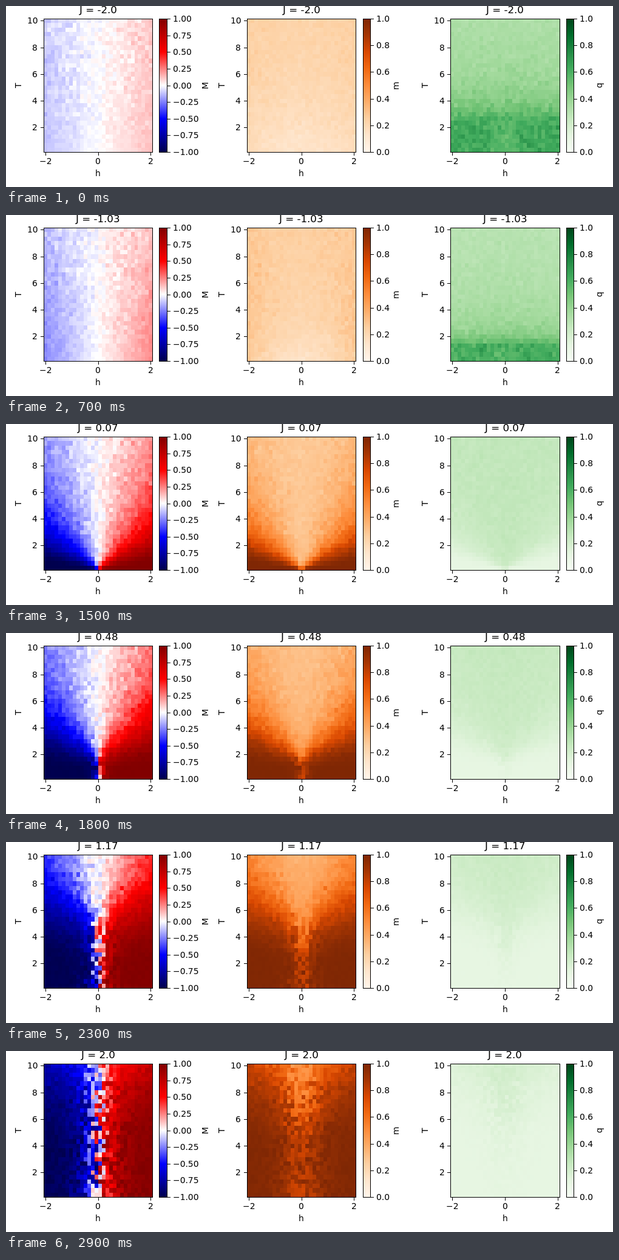
An HTML page with a canvas that plays this animation: 1000 px wide and 300 px high, repeating every 3000 ms.

```html
<!DOCTYPE html>
<html lang="en">
<head>
<meta charset="utf-8">
<title>Spin lattice maps</title>
<style>
html, body { margin: 0; width: 100%; height: 100%; overflow: hidden; background: #fff; }
canvas { display: block; }
</style>
</head>
<body>
<canvas id="stage" width="1000" height="300"></canvas>
<script>
const ctx = document.getElementById('stage').getContext('2d');
const N = 30, STEPS = 30, STEP_MS = 100;
const TOP = 21, W = 179.4, H = 221;
const FONT = '"DejaVu Sans", sans-serif';

const ramp = s => s.split(' ').map(c => [0, 2, 4].map(i => parseInt(c.substr(i, 2), 16)));
const seismic = ramp('00004d 0000ff ffffff ff0000 800000');
const oranges = ramp('fff5eb fee6ce fdd0a2 fdae6b fd8d3c f16913 d94801 a63603 7f2704');
const greens = ramp('f7fcf5 e5f5e0 c7e9c0 a1d99b 74c476 41ab5d 238b45 006d2c 00441b');

const panels = [
  { x: 62, bar: [252, 265], map: seismic, lo: -1, label: 'M', labelX: 333, tick: 0.25, digits: 2 },
  { x: 397, bar: [588, 600], map: oranges, lo: 0, label: 'm', labelX: 647, tick: 0.2, digits: 1 },
  { x: 732.3, bar: [923, 935], map: greens, lo: 0, label: 'q', labelX: 982, tick: 0.2, digits: 1 }
];

const clamp = (v, a, b) => Math.min(b, Math.max(a, v));

function color(map, v) {
  const p = clamp(v, 0, 1) * (map.length - 1);
  const i = Math.min(Math.floor(p), map.length - 2), f = p - i;
  return `rgb(${map[i].map((c, k) => Math.round(c + (map[i + 1][k] - c) * f))})`;
}

function random(seed) {
  return () => {
    seed = (seed + 0x6D2B79F5) | 0;
    let t = Math.imul(seed ^ (seed >>> 15), 1 | seed);
    t = (t + Math.imul(t ^ (t >>> 7), 61 | t)) ^ t;
    return ((t ^ (t >>> 14)) >>> 0) / 4294967296;
  };
}

const coupling = J => J < 0 ? 4 * J : (4 + 0.55 * J) * J;

// Mean-field magnetisation for a positive field h
function meanField(J, T, h) {
  const K = coupling(J);
  if (J < 0) {
    const ordered = Math.tanh(h / (Math.hypot(T, 4.4 * J) - K));
    return Math.max(ordered, Math.tanh((h + K) / T));
  }
  let M = 1;
  for (let i = 0; i < 40; i++) M = Math.tanh((h + K * M) / T);
  return M;
}

// Magnetisation, local magnetisation and local staggered order of one cell
function cell(J, T, h, rnd) {
  const gauss = () => (rnd() + rnd() + rnd() - 1.5) * 2;
  const a = Math.abs(h), x = J / T;
  const mean = meanField(J, T, a), free = 1 - mean * mean;
  const walls = J > 0 ? Math.exp(-a / (0.19 * J + 0.02)) + 0.01 * J : 0;
  const spread = 0.036 * Math.sqrt(free * T / Math.max(T - coupling(J) * free, 0.08 * T));
  const M = clamp(Math.sign(h) * mean * (1 - 2 * walls * rnd()) + spread * gauss(), -1, 1);

  const m0 = J < 0 ? 0.14 + 0.13 * Math.exp(2 * x) : Math.min(0.78, 0.27 * Math.exp(2.5 * x));
  const m = Math.sqrt(m0 * m0 * (1 - M * M) + M * M) + 0.011 * gauss() * (1 - M * M);

  let q0 = 0.14 + 0.13 * Math.exp(-2 * x), extra = 0;
  if (J < 0) {
    const grown = 0.27 * Math.exp(-x);
    extra = Math.min(0.61, grown) - 0.27;
    if (grown > 0.61) extra *= 1 - 0.2 * Math.exp(-4 * h * h);
    extra *= 1 - 0.4 * clamp(a / (-2 * J) - 1, 0, 1);
    q0 = 0.27 + extra;
  }
  const loose = Math.max(0, 1 - m * m);
  const q = 0.11 + 1.08 * (q0 - 0.11) * loose + (0.009 + 0.08 * extra) * loose * gauss();
  return [M, m, q];
}

// Text starts on whole pixels; align is the share of its width left of x
function text(s, x, y, align = 0.5, size = 13.89) {
  ctx.font = `${size}px ${FONT}`;
  ctx.fillText(s, Math.round(x - align * ctx.measureText(s).width), Math.round(y));
}

function sideways(s, x) {
  ctx.save();
  ctx.translate(Math.round(x), 132);
  ctx.rotate(-Math.PI / 2);
  text(s, 0, 0);
  ctx.restore();
}

function frame(x0, x1) {
  ctx.strokeRect(x0 + 0.5, TOP + 0.5, x1 - x0, H);
}

const signed = s => s.replace('-', '\u2212');

function drawAxes(p, title) {
  const mid = p.x + 89.7, [b0, b1] = p.bar, left = Math.round(p.x), bottom = TOP + H;
  for (let y = 0; y < H; y++) {
    ctx.fillStyle = color(p.map, 1 - (y + 0.5) / H);
    ctx.fillRect(b0, TOP + y, b1 - b0, 1);
  }
  ctx.fillStyle = ctx.strokeStyle = '#000';
  ctx.lineWidth = 1;
  frame(left, Math.round(p.x + W));
  frame(b0, b1);

  for (const h of [-2, 0, 2]) {
    const x = mid + h * 43.3;
    ctx.fillRect(Math.round(x), bottom + 1, 1, 5);
    text(signed(String(h)), x, 262);
  }
  for (let T = 2; T <= 10; T += 2) {
    const y = bottom - 0.3 - (T - 1 / 6) * 22.1;
    ctx.fillRect(left - 5, Math.round(y), 5, 1);
    text(String(T), p.x - 9.7, y + 5, 1);
  }
  const count = Math.round((1 - p.lo) / p.tick);
  for (let i = 0; i <= count; i++) {
    const y = Math.round(bottom - H * i / count);
    ctx.fillRect(b1 + 1, y, 5, 1);
    text(signed((p.lo + i * p.tick).toFixed(p.digits)), b1 + 10, y + 5, 0);
  }
  text('h', mid, 282);
  sideways('T', p.x - 37);
  sideways(p.label, p.labelX);
  text(title, mid, 12, 0.5, 16.67);
}

function draw(step) {
  const J = -2 + 4 * step / (STEPS - 1), rnd = random(step * 7919 + 17);
  const rounded = +J.toFixed(2);
  const title = 'J = ' + (Number.isInteger(rounded) ? rounded.toFixed(1) : rounded);
  ctx.fillStyle = '#fff';
  ctx.fillRect(0, 0, 1000, 300);
  for (let r = 0; r < N; r++) {
    const y0 = Math.round(TOP + r * H / N), y1 = Math.round(TOP + (r + 1) * H / N);
    for (let c = 0; c < N; c++) {
      const values = cell(J, (N - r) / 3, -2 + 4 * c / (N - 1), rnd);
      panels.forEach((p, i) => {
        const x0 = Math.round(p.x + c * W / N), x1 = Math.round(p.x + (c + 1) * W / N);
        ctx.fillStyle = color(p.map, (values[i] - p.lo) / (1 - p.lo));
        ctx.fillRect(x0, y0, x1 - x0, y1 - y0);
      });
    }
  }
  panels.forEach(p => drawAxes(p, title));
}

let shown = -1;
function tick() {
  const step = Math.floor(performance.now() / STEP_MS) % STEPS;
  if (step !== shown) draw(shown = step);
  requestAnimationFrame(tick);
}
tick();
</script>
</body>
</html>
```
